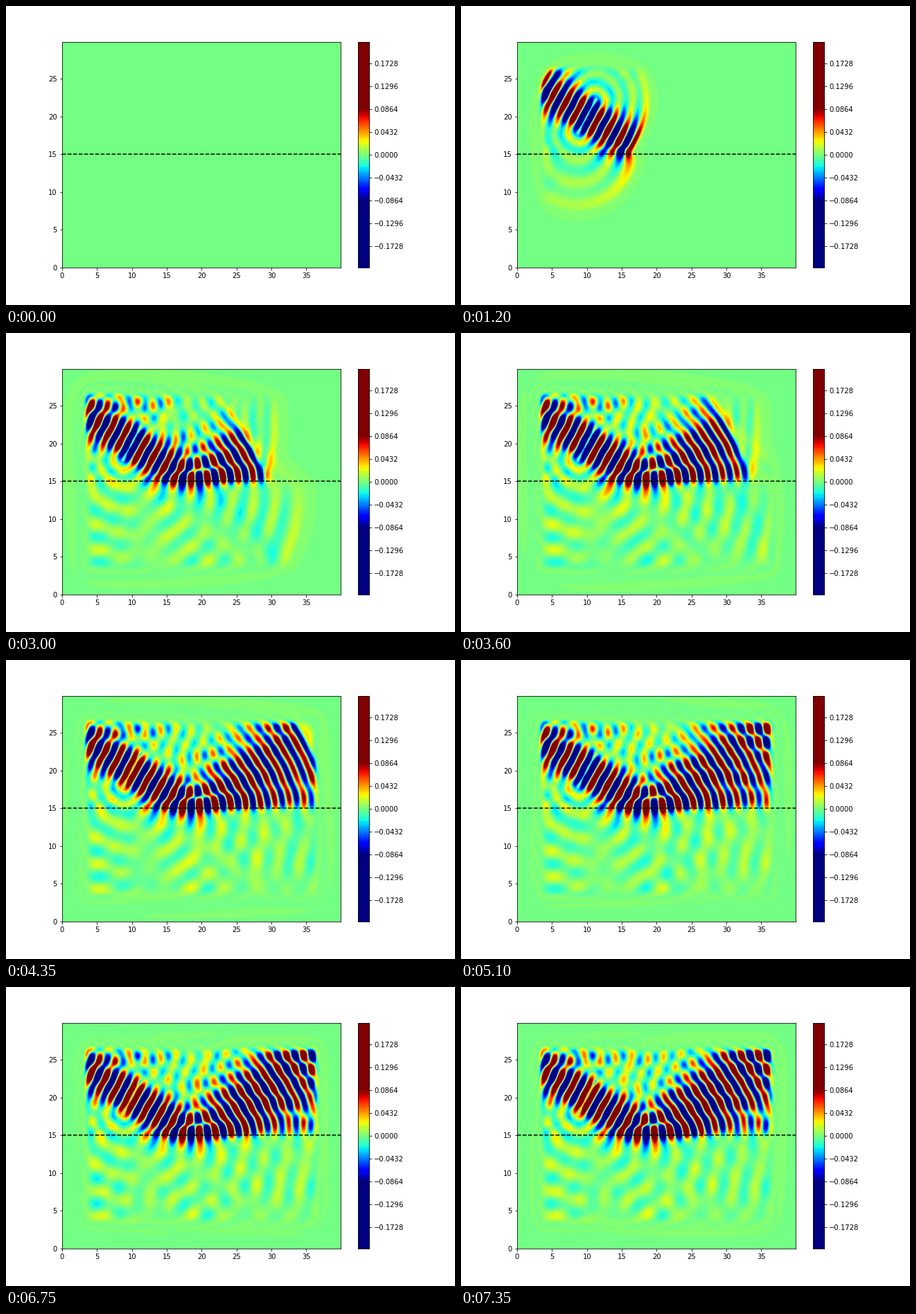
A matplotlib script for the animation above (7500 ms loop, 648 px wide and 432 px high).

```python
import numpy as np
import matplotlib.pyplot as plt
from matplotlib.animation import FuncAnimation
from matplotlib.colors import BoundaryNorm, ListedColormap

plt.rcParams.update({"font.family": "DejaVu Sans", "font.size": 10})

# Grid and timing (vacuum light speed is 1)
NX, NY, H = 400, 300, 0.1
COURANT = 0.5
DT = COURANT * H
FRAMES, STEPS, PERIOD = 50, 30, 60

# Beam: a tapered line source tilted to hit the interface at 60 degrees
X0, Y0, TILT = 10.0, 20.0, np.radians(30)
WAIST, HALF, DRIVE = 2.8, 2.75, 0.14
INTERFACE, INDEX = 15.0, 1.5

# Colour scale
STEP, SIDE = 0.0432 / 15, 74
LIMIT, CLIP = STEP * SIDE, 0.0864


def edge_depth(n, border=40):
    """Depth of each cell inside the absorbing border."""
    i = np.arange(n)
    return H * np.maximum(border - np.minimum(i, n - 1 - i), 0)


def simulate():
    """Field snapshots of the TE wave, one per animation frame."""
    x, y = np.arange(NX) * H, np.arange(NY) * H
    eps = np.where(y > INTERFACE - H / 2, INDEX ** 2, 1.0)[:, None]
    sx, sy = (40 * edge_depth(n) ** 2 for n in (NX, NY))
    loss = np.minimum(sx[None, :] + sy[:, None], 40) * DT / (2 * eps)
    keep = ((1 - loss) / (1 + loss))[1:-1, 1:-1].astype("f4")
    gain = (COURANT / eps / (1 + loss))[1:-1, 1:-1].astype("f4")

    s = (y - Y0) / np.cos(TILT)
    rows = np.flatnonzero(np.abs(s) <= HALF)
    cols = np.rint((X0 + s[rows] * np.sin(TILT)) / H).astype(int)
    taper = DRIVE * np.exp(-(s[rows] / WAIST) ** 2)

    e = np.zeros((NY, NX), "f4")
    hx = np.zeros((NY - 1, NX), "f4")
    hy = np.zeros((NY, NX - 1), "f4")
    half = np.float32(COURANT)
    shots = [e.copy()]
    for n in range(1, (FRAMES - 1) * STEPS + 1):
        hx -= half * (e[1:] - e[:-1])
        hy += half * (e[:, 1:] - e[:, :-1])
        curl = hy[1:-1, 1:] - hy[1:-1, :-1] - hx[1:, 1:-1] + hx[:-1, 1:-1]
        e[1:-1, 1:-1] = keep * e[1:-1, 1:-1] + gain * curl
        e[rows, cols] += taper * np.sin(2 * np.pi * n / PERIOD)
        if n % STEPS == 0:
            shots.append(e.copy())
    return shots


def shown(field):
    # The tiny offset puts an exact zero in the band just below it
    return np.clip(field.astype(float), -LIMIT, LIMIT) - 1e-6


shots = simulate()

levels = STEP * np.arange(-SIDE, SIDE + 1)
mids = (levels[1:] + levels[:-1]) / 2
cmap = ListedColormap(plt.get_cmap("jet")(np.clip(0.5 + mids / (2 * CLIP), 0, 1)))
norm = BoundaryNorm(levels, len(mids))

fig = plt.figure(figsize=(9, 6), dpi=72, facecolor="white")
ax = fig.add_axes([0.125, 0.125, 0.62, 0.755])
xmax, ymax = (NX - 1) * H, (NY - 1) * H
image = ax.imshow(shown(shots[0]), origin="lower", aspect="auto", cmap=cmap, norm=norm,
                  extent=(-H / 2, xmax + H / 2, -H / 2, ymax + H / 2),
                  interpolation="bilinear", interpolation_stage="data")
ax.plot([0, xmax], [INTERFACE, INTERFACE], "k--", lw=1.5)
ax.set(xlim=(0, xmax), ylim=(0, ymax),
       xticks=range(0, 40, 5), yticks=range(0, 30, 5))

cax = fig.add_axes([0.78375, 0.125, 0.755 * 432 / 20 / 648, 0.755])
cax.imshow(mids[:, None], origin="lower", aspect="auto", cmap=cmap, norm=norm,
           extent=(0, 1, -LIMIT, LIMIT), interpolation="nearest")
ticks = 0.0432 * np.arange(-4, 5)
cax.set_xticks([])
cax.yaxis.tick_right()
cax.set_yticks(ticks, [f"{t:.4f}".replace("-", "\u2212") for t in ticks])


def update(i):
    image.set_data(shown(shots[i]))
    return [image]


anim = FuncAnimation(fig, update, frames=FRAMES, interval=150, repeat=True,
                     repeat_delay=0, blit=False)
plt.show()
```
